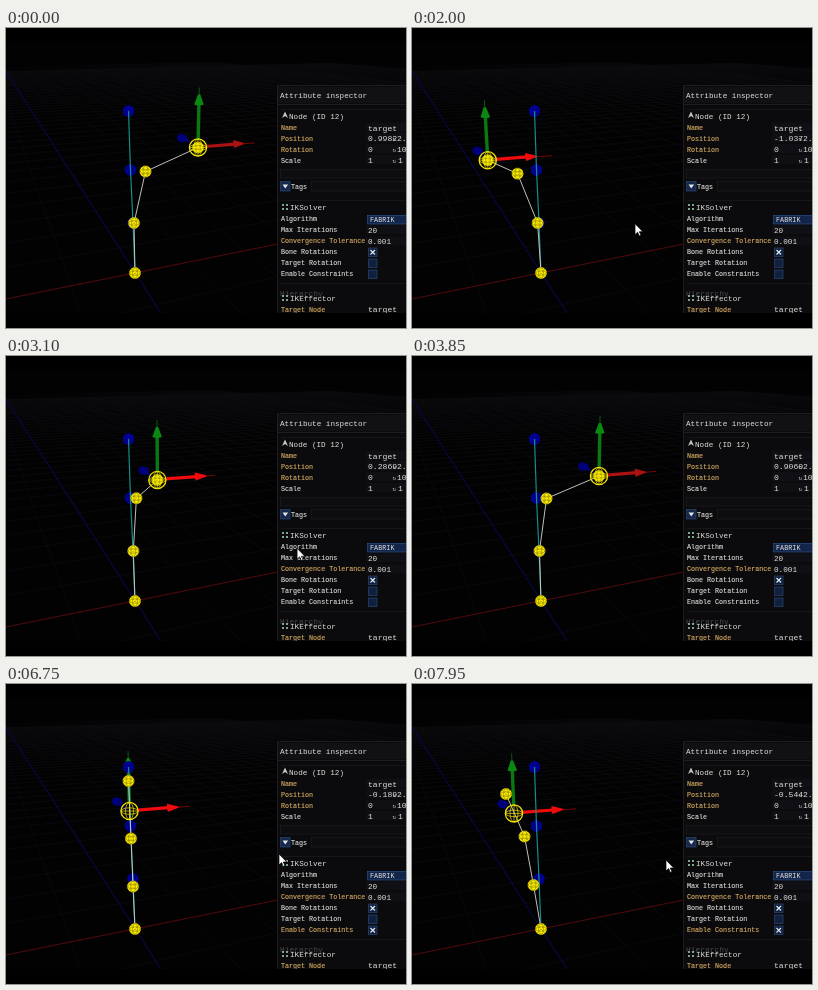
Write an HTML page that moves like this. It is 400 by 300 pixels and loops after 8000 ms.

```html
<!DOCTYPE html>
<html lang="en">
<head>
<meta charset="utf-8">
<title>Inverse kinematics demo</title>
<style>
html, body { margin: 0; width: 100%; height: 100%; overflow: hidden; background: #000; }
svg { display: block; width: 100vw; height: 100vh; }
text { font-family: "Liberation Mono", "DejaVu Sans Mono", monospace; white-space: pre; }
</style>
</head>
<body>
<svg id="stage" viewBox="0 0 400 300">
  <defs>
    <clipPath id="view"><rect y="15" width="400" height="270"/></clipPath>
    <clipPath id="field"><rect x="360" y="104" width="31" height="12"/></clipPath>
    <g id="wires" fill="none" stroke-width=".8">
      <ellipse rx="2.4" ry="5.2"/><ellipse rx="5.2" ry="2.2"/>
      <path d="M-4-4 L4 4 M4-4 L-4 4" stroke-dasharray="1.5 1.5"/>
    </g>
    <g id="yellow">
      <circle r="5.7" fill="#fff000" stroke="#c8b800" stroke-width=".5" stroke-dasharray="2 1"/>
      <use href="#wires" stroke="#6c6200" opacity=".7"/>
    </g>
    <g id="blue">
      <circle r="5.7" fill="#0000b4"/>
      <use href="#wires" stroke="#000050" opacity=".8"/>
    </g>
  </defs>
  <rect width="400" height="300" fill="#000"/>
  <g clip-path="url(#view)">
    <rect y="15" width="400" height="270" fill="#020203"/>
    <path id="grid" fill="none" stroke="#0e0e12" stroke-width=".6"/>
    <path d="M0 43 L155 285" stroke="#07075e" stroke-width=".9"/>
    <path d="M0 271 L400 190" stroke="#5a0a0a" stroke-width=".9"/>
    <g id="gizmo">
      <path d="M0 0 L-12-8" stroke="#000068" stroke-width="2"/>
      <path id="zTip" d="M-6-1 L-3-5 L4-3 L5 1 L1 4 L-4 3Z" fill="#00007c"/>
      <g id="yAxis">
        <path d="M0-8 V-60" stroke="#075d0c" stroke-width="1"/>
        <path d="M0-8 V-44" stroke="#087a10" stroke-width="3.4"/>
        <path d="M-4.8-43 L-1.2-53 H1.2 L4.8-43 Q0-41 -4.8-43Z" fill="#0a8812"/>
      </g>
      <path id="xLine" stroke="#720808" stroke-width="1"/>
      <g id="xAxis">
        <path d="M8-1 L39-3.4" stroke-width="3.2" stroke="currentColor"/>
        <path d="M37.5-7.4 L49-4.6 V-3.4 L38.5 .6 Q36.5-3 37.5-7.4Z" fill="currentColor"/>
      </g>
    </g>
    <use href="#blue" x="122.5" y="83"/>
    <use href="#blue" x="124.5" y="142"/>
    <use href="#blue" x="127" y="195"/>
    <path d="M122.5 83 L124.5 142 L127 195 L129 245" fill="none" stroke="#168c8c" stroke-width="1.2"/>
    <path id="bones" fill="none" stroke="#d4d4ce" stroke-width=".9"/>
    <use href="#yellow" x="129" y="245"/>
    <use id="j1" href="#yellow"/>
    <use id="j2" href="#yellow"/>
    <use id="tip" href="#yellow"/>
    <g id="target" fill="none" stroke="#f2e400">
      <circle r="8.6" stroke-width="1.3"/>
      <g stroke-width=".7"><ellipse rx="4" ry="8.4"/><ellipse rx="8.4" ry="3.2"/><path d="M0-8.5V8.5M-8.5 0H8.5"/></g>
    </g>
  </g>
  <g id="panel">
    <rect x="271" y="57" width="129" height="228" fill="#0b0b0d"/>
    <rect x="271" y="59" width="129" height="16" fill="#111114"/>
    <path d="M271.5 285 V57.5 H400 M271 76.5 H400" fill="none" stroke="#24242a" stroke-width=".7"/>
    <path d="M275 81.5H400 M275 172.5H400 M275 255.5H400" stroke="#1b1b20" stroke-width=".7"/>
  </g>
  <path id="cursor" d="M0 0 V11 L2.6 8.6 L4.3 12.4 L6 11.6 L4.3 8 H7.8Z" fill="#fff" stroke="#000" stroke-width=".7"/>
  <rect y="285" width="400" height="15" fill="#000"/>
</svg>
<script>
const LOOP = 8000, STEP = 50;
const WHITE = "#dededb", GOLD = "#dcae64";
const $ = id => document.getElementById(id);
const panel = $("panel");

function add(tag, attrs, content = "") {
  const el = document.createElementNS("http://www.w3.org/2000/svg", tag);
  for (const k in attrs) el.setAttribute(k, attrs[k]);
  el.textContent = content;
  return panel.appendChild(el);
}
const text = (x, y, s, size = 6.7, fill = WHITE) => add("text", { x, y, "font-size": size, fill }, s);
const label = (y, s, fill) => {
  const el = text(275, y, s, 6.7, fill);
  el.setAttribute("stroke", fill || WHITE);
  el.setAttribute("stroke-width", ".12");
  return el;
};
const box = (x, y, width, height, fill, stroke = "none") =>
  add("rect", { x, y, width, height, fill, stroke, "stroke-width": .7 });

function checkbox(y) {
  box(362.5, y, 8.5, 8.5, "#10203d", "#2b4674");
  return add("path", { d: `M364.5 ${y + 2} l4.5 4.5 m0 -4.5 l-4.5 4.5`, stroke: "#e4e8f0", "stroke-width": 1.2 });
}

function vectorRow(y, name, fill, first, second, x2) {
  label(y, name, fill);
  box(360, y - 7.5, 40, 9, "#101014");
  const value = text(362, y + .5, first, 8.1);
  text(386.5, y, "↻", 6, "#b8b8b4");
  text(x2, y + .5, second, 8.1);
  return value;
}

function nodeIcon(y) {
  for (const [dx, dy] of [[0, 0], [4, 0], [0, 4], [4, 4]]) box(276 + dx, y + dy, 2, 2, "#7fa58c");
}

text(274, 70, "Attribute inspector", 7.65);
text(283, 90.5, "Node (ID 12)", 7.65);
add("path", { d: "M276 90 L279 83.5 L282 90 L279 88Z", fill: "#c8c8c4" });
label(101.5, "Name", GOLD);
box(360, 94.5, 40, 9, "#101014");
text(362, 102.5, "target", 8.1);
const posX = vectorRow(112.5, "Position", GOLD, "", "2.", 391);
posX.setAttribute("clip-path", "url(#field)");
vectorRow(123.5, "Rotation", GOLD, "0", "10", 391);
vectorRow(134.5, "Scale", WHITE, "1", "1", 392);
box(274.5, 141.5, 130, 8.5, "#0d0d10", "#1d1d22");
box(274.5, 153.5, 9.5, 9.5, "#16294a", "#2b4674");
add("path", { d: "M276.5 156.5 h5.6 l-2.8 4Z", fill: "#e4e4e4" });
label(160.5, "Tags").setAttribute("x", 285);
box(305.5, 153.5, 100, 9.5, "#0d0d10", "#1d1d22");

nodeIcon(176);
text(284, 182, "IKSolver", 7.65);
label(193, "Algorithm");
box(361.5, 187.5, 45, 8.5, "#13264a", "#2c4c86");
text(364, 194, "FABRIK", 6.8);
label(204, "Max Iterations");
box(360, 197.5, 40, 8.5, "#101014");
text(362, 205, "20", 7.7);
label(215, "Convergence Tolerance", GOLD);
box(360, 208.5, 40, 8.5, "#101014");
text(362, 216, "0.001", 7.7);
label(226, "Bone Rotations");
checkbox(220);
label(237, "Target Rotation");
checkbox(231).setAttribute("visibility", "hidden");
const limitLabel = label(248, "Enable Constraints");
const limitMark = checkbox(242);
text(274, 267.5, "Hierarchy", 7.9, "#4a4a4c");
nodeIcon(267);
text(284, 273, "IKEffector", 7.65);
label(284, "Target Node", GOLD);
text(362, 284, "target", 8.1);

// Ground grid from two vanishing points on the horizon
(function drawGrid() {
  const o = [129, 245], red = [1300, 10], blue = [-21, 10], a = .026, b = .12;
  const at = (i, j) => {
    const w = 1 + a * i + b * j;
    return [0, 1].map(k => ((o[k] + a * i * red[k] + b * j * blue[k]) / w).toFixed(1)).join(" ");
  };
  let d = "";
  for (let i = -24; i <= 60; i += 2) d += `M${at(i, (-.7 - a * i) / b)}L${at(i, 60)}`;
  for (let j = -3; j <= 50; j++) d += `M${at((-.7 - b * j) / a, j)}L${at(90, j)}`;
  $("grid").setAttribute("d", d);
})();

// Monotone cubic through rows of [position, value, value, ...]
function curve(keys, t) {
  const last = keys.length - 1;
  if (t <= keys[0][0]) return keys[0].slice(1);
  if (t >= keys[last][0]) return keys[last].slice(1);
  const i = keys.findIndex(k => k[0] > t) - 1;
  const [p, q] = [keys[i], keys[i + 1]], h = q[0] - p[0], u = (t - p[0]) / h;
  const slope = (n, c) => (keys[n + 1][c] - keys[n][c]) / (keys[n + 1][0] - keys[n][0]);
  const tangent = (n, c) => {
    if (n === 0 || n === last) return 0;
    const l = slope(n - 1, c), r = slope(n, c);
    return l * r > 0 ? 2 * l * r / (l + r) : 0;
  };
  return p.slice(1).map((v, c) => {
    c++;
    return v + (q[c] - v) * u * u * (3 - 2 * u)
      + h * u * (1 - u) * ((1 - u) * tangent(i, c) - u * tangent(i + 1, c));
  });
}

const targetKeys = [[450, 192], [1000, 186], [1150, 185], [1450, 160], [1950, 83], [2250, 48],
  [2600, 90], [2850, 122], [3250, 165], [3650, 186], [3850, 187], [5600, 187], [6000, 172],
  [6400, 148], [6750, 123.5], [7250, 72], [7500, 50], [7950, 102]];
const jointKeys = [[450, 128, 195, 139.5, 143.5], [1150, 128, 195, 134, 143],
  [1450, 127.5, 195, 116.5, 141], [1950, 126, 195, 107, 145], [2250, 123, 195.5, 98, 149],
  [2600, 127, 195, 124, 142], [3850, 127.5, 195, 134.5, 142.5], [5000, 127.5, 195, 134.5, 142.5],
  [5150, 130, 195.5, 131, 141.5], [5600, 130, 195.5, 131, 141.5], [6400, 128.5, 200, 128, 149],
  [6750, 127, 202.5, 125, 154.5], [7250, 120, 201, 109, 153.5], [7500, 118, 202, 103, 157],
  [7950, 121.5, 201, 112.5, 152.5]];
const tipKeys = [[5600, 187, 120], [6000, 168, 108], [6400, 143, 98], [6750, 122.5, 97],
  [7250, 80, 114], [7500, 66, 126], [7950, 94, 110]];
const cursorKeys = [[250, 338, 176], [1000, 331, 179], [1450, 304, 183], [1950, 230, 194],
  [2250, 196, 204], [2600, 238, 200], [2850, 268, 196], [3700, 331, 186], [4750, 350, 238],
  [5000, 364, 241], [5450, 378, 219], [5650, 336, 178], [6400, 298, 174], [6750, 273, 170],
  [7250, 222, 180], [7500, 200, 184], [7950, 254, 176]];
const valueKeys = [[40, -1.6], [90, -.746], [102, -.5441], [123.5, -.1894], [160, .436],
  [187, .906], [192, .9982], [210, 1.33]];

const move = (el, x, y) => el.setAttribute("transform", `translate(${x.toFixed(2)} ${y.toFixed(2)})`);
const show = (el, on) => el.setAttribute("visibility", on ? "visible" : "hidden");

function draw(t) {
  const [tx] = curve(targetKeys, t), ty = 119.5 + (192 - tx) * .11;
  const [ax, ay, bx, by] = curve(jointKeys, t);
  const [ex, ey] = t < 5600 ? [tx, ty] : curve(tipKeys, t);
  const dragging = (t >= 450 && t < 3800) || t >= 5650;

  move($("gizmo"), tx, ty);
  move($("target"), tx, ty);
  move($("j1"), ax, ay);
  move($("j2"), bx, by);
  move($("tip"), ex, ey);
  $("bones").setAttribute("d", `M129 245L${ax} ${ay}L${bx} ${by}L${ex} ${ey}`);

  const lean = (tx - 160) * .035;
  $("yAxis").setAttribute("transform", `skewX(${(-lean * 1.1).toFixed(2)})`);
  move($("zTip"), -13.8 - (tx - 160) * .05, -9);
  $("xLine").setAttribute("d", `M8-1L${57 + Math.max(0, 160 - tx) * .09} -4.6`);
  $("xAxis").setAttribute("color", dragging ? "#f00c0c" : "#ac1212");
  $("xAxis").setAttribute("transform", `scale(${1 - Math.max(0, tx - 160) * .0018} 1)`);

  posX.textContent = curve(valueKeys, tx)[0].toFixed(4);
  const limited = t >= 5050;
  show(limitMark, limited);
  limitLabel.setAttribute("fill", limited ? GOLD : WHITE);
  limitLabel.setAttribute("stroke", limited ? GOLD : WHITE);

  move($("cursor"), ...curve(cursorKeys, t));
  show($("cursor"), (t >= 450 && t < 3750) || t >= 4750);
}

const start = performance.now();
function frame(now) {
  const t = Math.max(0, now - start) % LOOP;
  draw(Math.floor(t / STEP) * STEP);
  requestAnimationFrame(frame);
}
draw(0);
requestAnimationFrame(frame);
</script>
</body>
</html>
```
